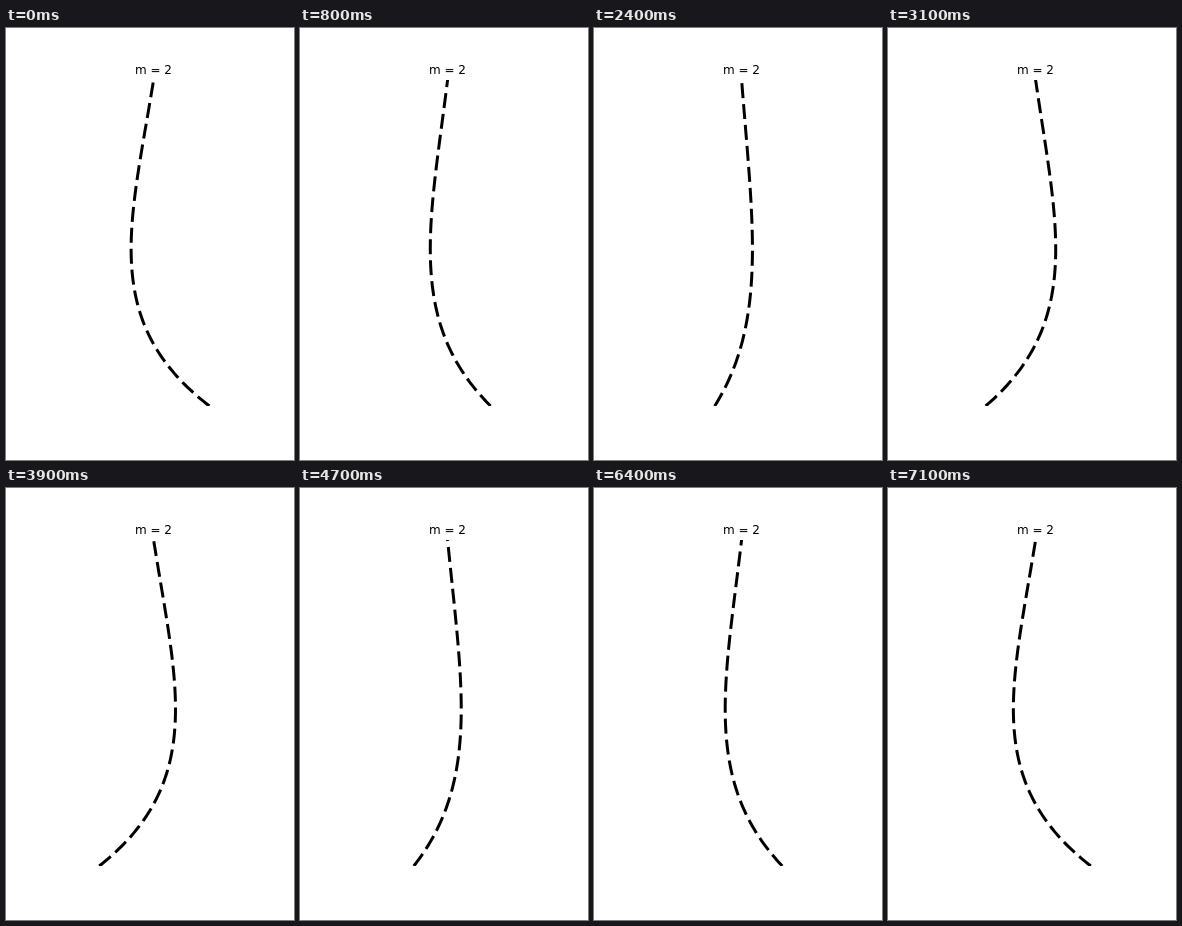
An HTML page for the animation above (7.2 s loop, 288 px wide and 432 px high).

```html
<!DOCTYPE html>
<html lang="en">
<head>
<meta charset="utf-8">
<title>Hanging chain, second mode</title>
<style>
  html, body { margin: 0; width: 100%; height: 100%; overflow: hidden; background: #fff; }
  svg { display: block; }
  text { font: 12px "DejaVu Sans", sans-serif; }
</style>
</head>
<body>
<svg width="288" height="432" viewBox="0 0 288 432">
  <clipPath id="axes"><rect x="36" y="52" width="223" height="326"/></clipPath>
  <text x="129" y="46">m = 2</text>
  <g clip-path="url(#axes)">
    <path id="chain" fill="none" stroke="#000" stroke-width="3" stroke-dasharray="15 6"/>
  </g>
</svg>
<script>
const chain = document.getElementById("chain");
const MID = 147.6, TOP = 51.84, BOTTOM = 378, AMP = 55.8;
const ROOT = 5.5200781;                          // second zero of J0
const OMEGA = ROOT / 2 * Math.sqrt(9.8);         // chain of length 1
const STEP = 100, STEPS = 72, DT = 0.01, POINTS = 160;

// Bessel function J0 by its power series
function j0(x) {
  let term = 1, sum = 1;
  for (let k = 1; k < 26; k++) {
    term *= -x * x / (4 * k * k);
    sum += term;
  }
  return sum;
}

// Mode shape from the free end (height 0) up to the support (height 1)
const shape = Array.from({ length: POINTS + 1 }, (_, i) => {
  const h = i / POINTS;
  return { y: BOTTOM - h * (BOTTOM - TOP), d: AMP * j0(ROOT * Math.sqrt(h)) };
});

function draw(ms) {
  const step = Math.floor(ms / STEP) % STEPS;
  const swing = Math.cos(OMEGA * step * DT);
  const pts = shape.map(p => (MID + swing * p.d).toFixed(3) + " " + p.y.toFixed(3));
  chain.setAttribute("d", "M" + pts.join("L"));
}

const start = performance.now();
function tick() {
  draw(performance.now() - start);
  requestAnimationFrame(tick);
}
tick();
</script>
</body>
</html>
```
